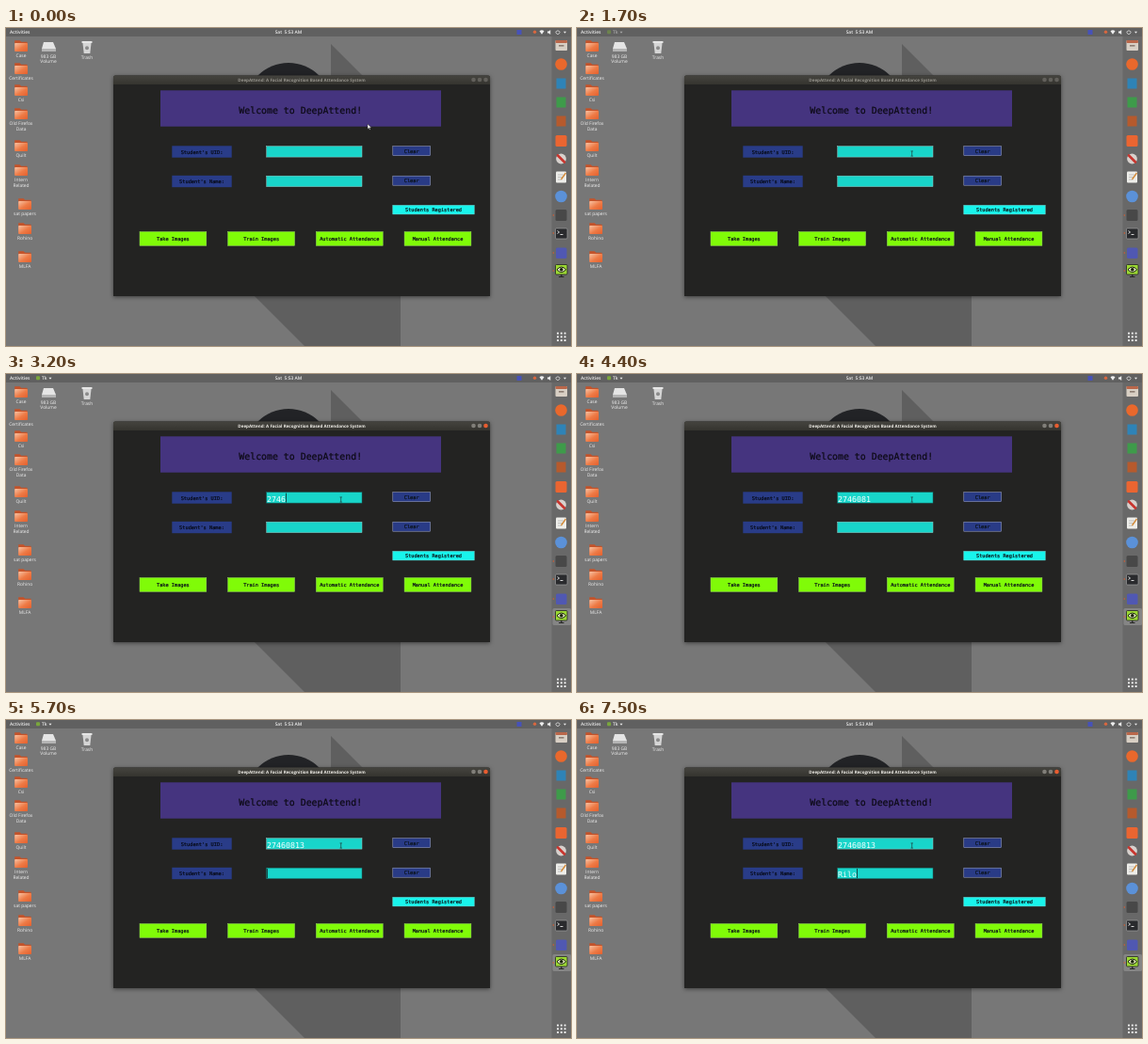
These frames come from a looping animation (600x338 px, 8 s). An HTML page:

```html
<!DOCTYPE html>
<html lang="en">
<head>
<meta charset="utf-8">
<title>Attendance form</title>
<style>
  html, body { margin: 0; width: 100%; height: 100%; overflow: hidden; background: #777; }
  svg { display: block; width: 100vw; height: 100vh; }
  text { text-rendering: geometricPrecision; white-space: pre; }
  .ui { font-family: "Open Sans", sans-serif; fill: #f0f0f0; }
  .mono { font-family: "DejaVu Sans Mono", monospace; }
  .label { stroke-width: 0.2; }
  .window { filter: drop-shadow(0 1px 2px rgba(0, 0, 0, 0.5)); }
</style>
</head>
<body>
<svg id="stage" viewBox="0 0 600 338" preserveAspectRatio="none">
  <defs>
    <linearGradient id="folder" x1="0" y1="0" x2="1" y2="1">
      <stop offset="0" stop-color="#f7c3a4"/>
      <stop offset="0.55" stop-color="#ee7a45"/>
      <stop offset="1" stop-color="#e4602e"/>
    </linearGradient>
    <linearGradient id="titlebar" x1="0" y1="0" x2="0" y2="1">
      <stop offset="0" stop-color="#45443f"/>
      <stop offset="1" stop-color="#35342f"/>
    </linearGradient>
  </defs>
</svg>
<script>
const LOOP = 8000, STEP = 100;
const stage = document.getElementById("stage");

function add(tag, attrs, parent = stage) {
  const node = document.createElementNS("http://www.w3.org/2000/svg", tag);
  for (const key in attrs) node.setAttribute(key, attrs[key]);
  return parent.appendChild(node);
}
const group = (attrs = {}, parent) => add("g", attrs, parent);
const rect = (x, y, width, height, fill, more = {}, parent) =>
  add("rect", { x, y, width, height, fill, ...more }, parent);
const circle = (cx, cy, r, fill, parent) => add("circle", { cx, cy, r, fill }, parent);
const path = (d, more, parent) => add("path", { d, ...more }, parent);
function text(value, x, y, size, more = {}, parent) {
  const node = add("text", { x, y, "font-size": size, ...more }, parent);
  node.textContent = value;
  return node;
}
const uiText = (value, x, y, size, more, parent) =>
  text(value, x, y, size, { class: "ui", "text-anchor": "middle", ...more }, parent);
const label = (value, x, y, size, color) =>
  text(value, x, y, size, { class: "mono label", "text-anchor": "middle", fill: color, stroke: color });

function drawWallpaper() {
  rect(0, 0, 600, 338, "#777777");
  path("M345 17L419 91V338H317L264 285V100H345Z", { fill: "#5f5f5f" });
  circle(300, 83, 46, "#222326");
}

function drawFolder(x, y, lines) {
  const g = group({ transform: `translate(${x} ${y})` });
  path("M-6.8 -5.8h5.5l1.5 1.5H6.5V5H-6.8Z", { fill: "#c4532a" }, g);
  rect(-6.8, -3, 13.8, 9, "url(#folder)", { rx: 0.8 }, g);
  lines.forEach((line, i) => uiText(line, 0, 12 + 6 * i, 4.9, {}, g));
}

function drawDesktop() {
  [
    [16, 19, "Case"], [16, 43, "Certificates"], [16, 66, "Csi"],
    [16, 91, "Old Firefox|Data"], [16, 125, "Quilt"], [16, 151, "Intern|Related"],
    [20, 187, "sat papers"], [20, 213, "Rohino"], [20, 243, "MLFA"],
  ].forEach(([x, y, name]) => drawFolder(x, y, name.split("|")));

  path("M40 15h10l3 7v2.5H38V22Z", { fill: "#e5e5e5" });
  rect(38, 22, 15, 2.5, "#b5b5b5");
  uiText("983 GB", 45, 31.5, 4.9);
  uiText("Volume", 45, 37, 4.9);

  path("M81.5 16h9l-1.2 11h-6.6Z", { fill: "#d5d5d5" });
  rect(80.3, 14, 11.4, 2, "#e6e6e6", { rx: 1 });
  circle(86, 21.3, 2, "#8b8b8b");
  uiText("Trash", 86, 33, 4.9);
}

function drawTopBar() {
  rect(0, 0, 600, 9, "#606060");
  uiText("Activities", 4, 6.2, 4.9, { "text-anchor": "start", "font-weight": 600 });
  uiText("Sat  5:53 AM", 300, 6.2, 4.9, { "font-weight": 600 });
  rect(542.5, 2, 5, 5, "#4752b8");
  circle(561.5, 4.3, 1.7, "#d9673f");
  path("M566.5 3.3q2.5-2 5 0l-2.5 3.4Z", { fill: "#eee" });
  path("M575 3.6h1.4l1.8-1.5v5l-1.8-1.5H575Z", { fill: "#eee" });
  path("M584.7 3a2 2 0 1 0 2.6 0M586 2v2", { fill: "none", stroke: "#eee", "stroke-width": 0.7 });
  path("M592 3.7h3l-1.5 2Z", { fill: "#eee" });
}

function drawDock() {
  rect(579.5, 9, 20.5, 329, "#686868");
  const highlight = rect(580.5, 249, 19.5, 18, "#858585", { rx: 1.5 });

  rect(583.5, 13, 12.5, 11, "#d8cfc4", { rx: 1 });
  rect(583.5, 13, 12.5, 3, "#b9674a", { rx: 1 });
  rect(587, 18, 5.5, 1.6, "#8d7d72");
  circle(589.5, 38.5, 6.3, "#e9682c");
  [[59, "#2e83b7"], [79, "#3e9b4a"], [99, "#b65a2d"]].forEach(([y, color]) =>
    rect(584.5, y - 5.5, 10, 11, color));
  rect(583.5, 114, 12, 12, "#ea6531", { rx: 1.5 });

  circle(589.5, 139, 5.4, "#d7d1cd");
  path("M586 135.5l7 7", { stroke: "#c8352e", "stroke-width": 2.6, "stroke-linecap": "round" });
  rect(584, 152.5, 11, 12, "#eeeeea", { rx: 1 });
  path("M586 156h6M586 158.5h5M586 161h4", { stroke: "#aaa", "stroke-width": 0.7 });
  path("M594.5 154l-5 7", { stroke: "#d28a39", "stroke-width": 1.4 });
  circle(589.5, 179, 6.3, "#5b91d8");
  rect(583.5, 193, 12, 12, "#484848", { rx: 1.5 });

  rect(583.5, 213, 12.5, 11, "#292a2d", { rx: 1, stroke: "#aaa", "stroke-width": 0.6 });
  path("M585.5 215.5l2 1.5-2 1.5M588.5 219.5h3", { fill: "none", stroke: "#fff", "stroke-width": 0.8 });
  rect(584, 233.5, 11.5, 11.5, "#5058b2", { rx: 1.5 });

  rect(583.5, 251.5, 12.5, 10.5, "#9bd833", { rx: 1, stroke: "#222", "stroke-width": 0.8 });
  path("M587 264.5h5.5M589.8 262v2.5", { stroke: "#222", "stroke-width": 1.2 });
  path("M585 256.8q4.8-5.5 9.6 0q-4.8 5.5-9.6 0Z", { fill: "#e4ecc0", stroke: "#172009", "stroke-width": 1 });
  circle(589.8, 256.8, 1.8, "#172009");

  [199, 218, 239, 258].forEach(y => circle(581.3, y, 0.7, "#e35b2a"));
  for (let i = 0; i < 9; i++)
    rect(585 + (i % 3) * 3.8, 323.5 + Math.floor(i / 3) * 3.8, 2, 2, "#eee", { rx: 0.5 });
  return highlight;
}

function drawButton(x, y, width, height, fill, name, edge) {
  rect(x, y, width, height, fill, { stroke: edge, "stroke-width": 0.5 });
  label(name, x + width / 2, y + height / 2 + 1.9, 5.25, "#0a1218");
}

function drawWindow() {
  path("M114 285V52.5q0-2 2-2h396q2 0 2 2V285Z", { fill: "#232322", class: "window" });
  path("M114 60V52.5q0-2 2-2h396q2 0 2 2V60Z", { fill: "url(#titlebar)" });
  const title = uiText("DeepAttend: A Facial Recognition Based Attendance System",
    314, 56.8, 4.55, { "font-weight": 700 });
  const controls = [496.5, 503, 509.5].map(x => circle(x, 55, 2.3, "#666"));

  rect(164, 66.3, 298, 38.4, "#45347f");
  label("Welcome to DeepAttend!", 312.7, 90.7, 9.9, "#0c0a14");

  [[125.3, "Student's UID:"], [156.8, "Student's Name:"]].forEach(([y, name]) => {
    rect(176.3, y, 63.4, 12.4, "#293c88");
    label(name, 208, y + 8.3, 5.3, "#070b18");
    drawButton(410.8, y + 0.4, 39.8, 10, "#293b86", "Clear", "#a7adcb");
  });
  drawButton(410.8, 188.5, 86.4, 9.4, "#18f4ec", "Students Registered", "#6cf0ea");
  ["Take Images", "Train Images", "Automatic Attendance", "Manual Attendance"].forEach((name, i) =>
    drawButton(142 + 93.7 * i, 216.6, 70.8, 14.7, "#80fb08", name, "#98dd5c"));
  return { title, controls };
}

function makeEntry(y) {
  return {
    box: rect(276.7, y + 0.7, 101.3, 11.4, "#18d5ca", { "stroke-width": 0.5 }),
    value: text("", 277, y + 10.6, 8.3, { class: "mono", fill: "#f5ffff" }),
    caret: rect(0, y + 1.6, 0.8, 10, "#102b2b"),
  };
}

// Key press times, and the span during which each field has the focus.
const uid = { text: "27460813", keys: [2600, 2700, 2900, 3200, 3800, 4200, 4400, 4700], from: 1800, to: 5700 };
const studentName = { text: "Rilo", keys: [6700, 7100, 7200, 7500], from: 5700, to: LOOP };

function showEntry(entry, field, time) {
  const count = field.keys.filter(key => key <= time).length;
  const focused = time >= field.from && time < field.to;
  const caretOn = focused && (time - field.from) % 900 < 600;
  entry.value.textContent = field.text.slice(0, count);
  entry.box.setAttribute("stroke", focused ? "#176e69" : "#8fd0ca");
  entry.caret.setAttribute("x", 277 + 5 * count);
  entry.caret.setAttribute("visibility", caretOn ? "visible" : "hidden");
}

drawWallpaper();
drawDesktop();
drawTopBar();
const dockHighlight = drawDock();
const { title, controls } = drawWindow();
const entries = [makeEntry(125), makeEntry(156.5)];

const appMenu = group();
rect(32, 2.2, 4, 4, "#7aa63c", { rx: 1 }, appMenu);
uiText("Tk", 38, 6.2, 4.9, { "text-anchor": "start", "font-weight": 600 }, appMenu);
path("M45.5 3.7h3l-1.5 2Z", { fill: "#eee" }, appMenu);

const arrow = path("M0 0V5.4L1.3 4.2 2.2 6.2 3.1 5.8 2.2 3.9H4Z",
  { fill: "#f8f8f8", stroke: "#222", "stroke-width": 0.4 });
const beam = path("M-1.2 -2.6H1.2M0 -2.6V2.6M-1.2 2.6H1.2",
  { fill: "none", stroke: "#1d3f3f", "stroke-width": 0.7 });

const clamp = value => Math.max(0, Math.min(1, value));

function showPointer(time) {
  const p = clamp((time - 1000) / 600);
  const eased = p * p * (3 - 2 * p);
  const x = 384 - 28.3 * eased, y = 102 + 31.5 * eased;
  const overEntry = y > 125 && x < 378;
  for (const node of [arrow, beam]) node.setAttribute("transform", `translate(${x} ${y})`);
  arrow.setAttribute("visibility", overEntry ? "hidden" : "visible");
  beam.setAttribute("visibility", overEntry ? "visible" : "hidden");
}

function render(now) {
  const time = Math.floor((now % LOOP) / STEP) * STEP;
  const active = time >= 1800;
  title.style.fill = active ? "#f0eee8" : "#96948d";
  controls.forEach((node, i) =>
    node.setAttribute("fill", !active ? "#62605b" : i === 2 ? "#e85d30" : "#817f79"));
  dockHighlight.setAttribute("opacity", active ? 1 : 0);
  appMenu.setAttribute("opacity", clamp((time - 1500) / 400));
  showPointer(time);
  showEntry(entries[0], uid, time);
  showEntry(entries[1], studentName, time);
}

const start = performance.now();
function tick() {
  render(performance.now() - start);
  requestAnimationFrame(tick);
}
tick();
</script>
</body>
</html>
```
